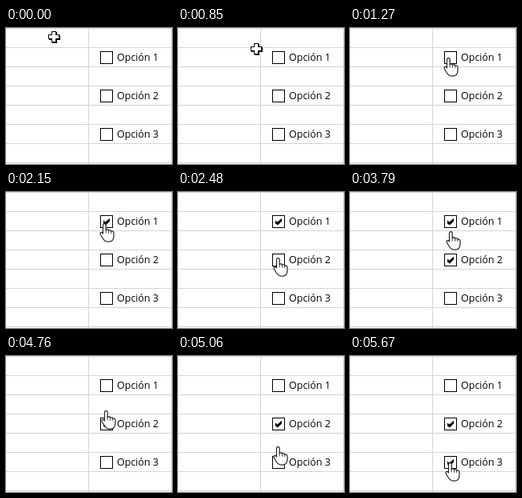
These frames come from a looping animation (208 by 170 pixels, 6.85 s). An HTML page:

```html
<!DOCTYPE html>
<html lang="es">
<head>
<meta charset="utf-8">
<title>Casillas de verificación</title>
<style>
html, body { margin: 0; width: 100%; height: 100%; overflow: hidden; background: #fff; }
svg { display: block; width: 208px; height: 170px; }
text { font: 12.5px "Open Sans", "Noto Sans", sans-serif; fill: #000; }
</style>
</head>
<body>
<svg viewBox="0 0 208 170">
  <rect width="208" height="170" fill="#fff"/>
  <path id="grid" stroke="#d4d4d4" fill="none"/>
  <g id="options"></g>
  <g id="cross">
    <path d="M-2 -6H4V-2H8V4H4V8H-2V4H-6V-2H-2Z"/>
    <path d="M-3 -7H3V-3H7V3H3V7H-3V3H-7V-3H-3Z"/>
    <path d="M-2 -6H2V-2H6V2H2V6H-2V2H-6V-2H-2Z" fill="#fff"/>
  </g>
  <g id="hand" fill="#fff" stroke="#222" stroke-width="1.2" stroke-linejoin="round" stroke-linecap="round">
    <path d="M-2.5 2.4C-2.5 0 1.2 0 1.2 2.4V8.5C2.4 7.4 4.4 7.8 4.6 9.2C5.8 8.3 7.6 8.8 7.8 10.2C9.2 9.5 11 10.4 11 12.2V16C11 20.5 8.5 23.2 4.5 23.2C1.2 23.2 -1 21.8 -2.2 19.8L-5.8 14C-6.8 12.2 -4.6 10.4 -3.2 12L-2.5 13Z"/>
    <path d="M1.2 8V12M4.6 9.2V12.3M7.8 10.2V12.6" fill="none" stroke-width=".9"/>
  </g>
</svg>
<script>
const LOOP = 6850;
const $ = id => document.getElementById(id);

// bow: sideways swing in pixels; skew: below 1 leans the easing early, above 1 late
const stops = [{ x: 60, y: 11 }, { x: 124, y: 37 }, { x: 125, y: 88 }, { x: 125, y: 40 }, { x: 126, y: 133 }];
const moves = [
  { from: 450, to: 1270, bow: 0, skew: .8 },
  { from: 2120, to: 2610, bow: 3, skew: .8 },
  { from: 3420, to: 3970, bow: 3, skew: .8 },
  { from: 4270, to: 5300, bow: 1, skew: 1.35 }
];
// spans during which each box is ticked
const ticked = [[1700, 4270], [2880, LOOP], [5610, LOOP]];

let lines = "M103.5 0V170M207.5 0V170";
for (let y = 0; y < 170; y += 24) lines += `M0 ${y + .5}H208`;
$("grid").setAttribute("d", lines);

$("options").innerHTML = ticked.map((_, i) => `
  <g transform="translate(118 ${29 + 48 * i})">
    <rect x=".5" y=".5" width="15" height="15" fill="#fff" stroke="#000"/>
    <path class="tick" d="M4 6.5L6.5 8.5L12 3.8V7.5L7 12.5L4 10.5Z"/>
    <text x="21" y="12">Opción ${i + 1}</text>
  </g>`).join("");
const ticks = document.querySelectorAll(".tick");

function pointer(t) {
  let { x, y } = stops[0];
  moves.forEach(({ from, to, bow, skew }, i) => {
    if (t < from) return;
    const u = Math.min(1, (t - from) / (to - from)) ** skew;
    const k = u * u * (3 - 2 * u);
    const a = stops[i], b = stops[i + 1];
    x = a.x + (b.x - a.x) * k + bow * Math.sin(Math.PI * k);
    y = a.y + (b.y - a.y) * k;
  });
  return [Math.round(x), Math.round(y)];
}

const show = (el, on) => el.setAttribute("visibility", on ? "visible" : "hidden");

function draw(t) {
  const [x, y] = pointer(t);
  const over = x >= 113;
  for (const id of ["cross", "hand"]) {
    $(id).setAttribute("transform", `translate(${x} ${y})`);
    show($(id), over === (id === "hand"));
  }
  ticked.forEach(([from, to], i) => show(ticks[i], t >= from && t < to));
}

const start = performance.now();
function frame() {
  draw((performance.now() - start) % LOOP);
  requestAnimationFrame(frame);
}
frame();
</script>
</body>
</html>
```
